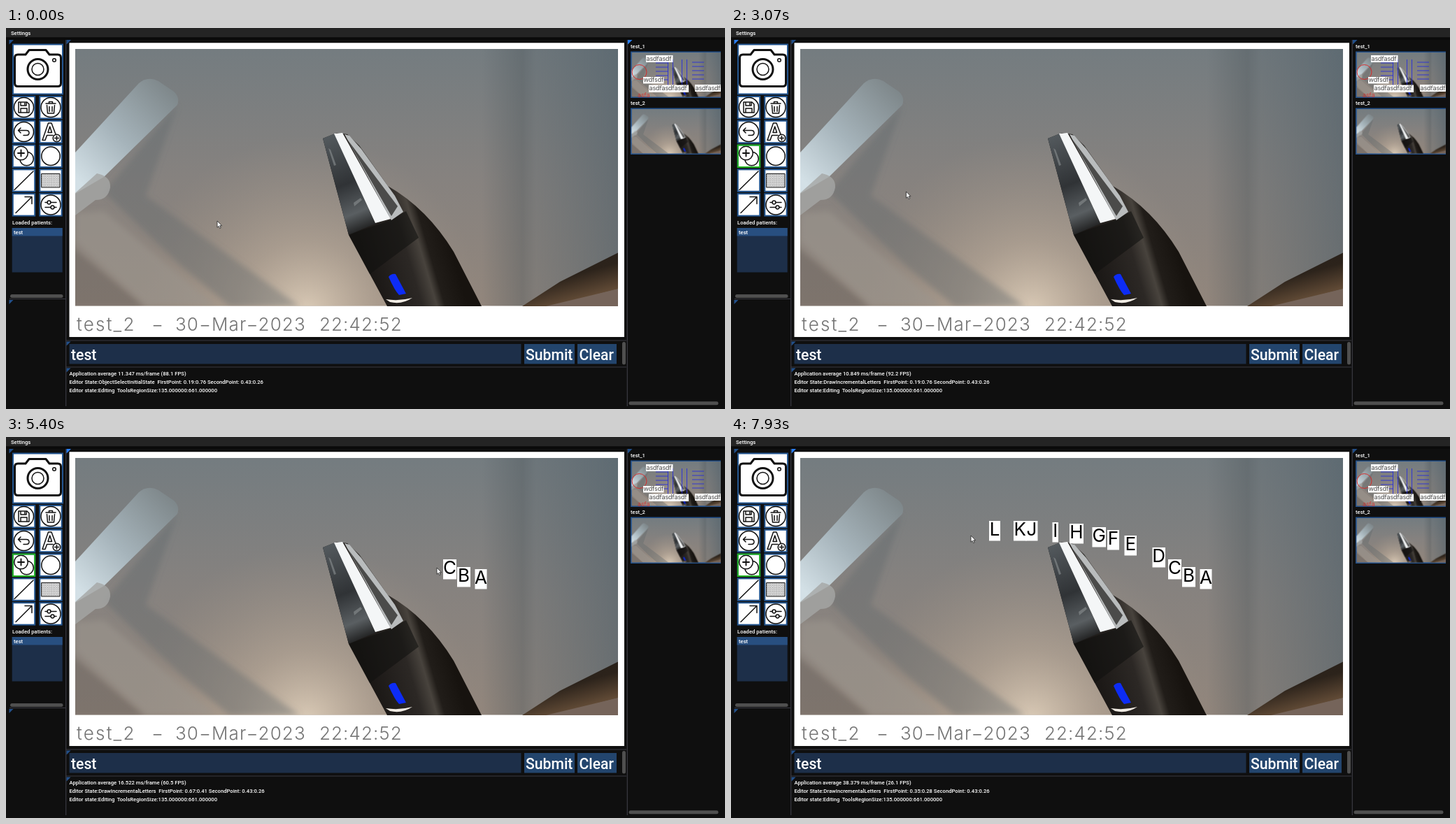
Animation, 1028 px wide and 545 px high, one loop 8 s. Source, as an HTML page:

```html
<!DOCTYPE html>
<html lang="en">
<head>
<meta charset="utf-8">
<title>Image editor</title>
<style>
  html, body { margin: 0; width: 100%; height: 100%; overflow: hidden; background: #0f0f0f; }
  svg { position: absolute; inset: 0; width: 100%; height: 100%; }
  #live { will-change: transform; }
  text { font: 500 7.65px Roboto, sans-serif; fill: #fff; white-space: pre; }
  .big { font-size: 21.2px; }
  .plot { font: 300 26px Inter, sans-serif; fill: #747474; letter-spacing: 1.1px; }
  .letter { font: 400 26px Inter, sans-serif; fill: #000; text-anchor: middle; }
  .note { font: 300 9px Inter, sans-serif; fill: #111; }
  .icon { fill: none; stroke: #111; stroke-width: 1.5; stroke-linecap: round; stroke-linejoin: round; }
</style>
</head>
<body>
<svg viewBox="0 0 1028 545" preserveAspectRatio="none">
  <defs>
    <linearGradient id="wall" x2="0" y2="1">
      <stop stop-color="#747c80"/><stop offset=".5" stop-color="#86827f"/><stop offset="1" stop-color="#92867c"/>
    </linearGradient>
    <radialGradient id="glow">
      <stop stop-color="#e2d2bd" stop-opacity=".9"/><stop offset=".4" stop-color="#c4b3a0" stop-opacity=".5"/>
      <stop offset="1" stop-color="#a39688" stop-opacity="0"/>
    </radialGradient>
    <linearGradient id="shade">
      <stop stop-color="#4c565b" stop-opacity="0"/><stop offset=".3" stop-color="#4c565b" stop-opacity=".38"/>
      <stop offset=".4" stop-color="#5a666d" stop-opacity=".3"/><stop offset="1" stop-color="#4f5f69" stop-opacity=".6"/>
    </linearGradient>
    <linearGradient id="blade" gradientUnits="userSpaceOnUse" x1="100" y1="215" x2="235" y2="85">
      <stop stop-color="#d3e0e6"/><stop offset=".45" stop-color="#a6b4bb"/><stop offset="1" stop-color="#7e878a"/>
    </linearGradient>
    <linearGradient id="facet" gradientUnits="userSpaceOnUse" x1="460" y1="155" x2="515" y2="290">
      <stop stop-color="#53595d"/><stop offset=".5" stop-color="#303336"/><stop offset=".8" stop-color="#5a5f62"/><stop offset="1" stop-color="#1c1c1c"/>
    </linearGradient>
    <linearGradient id="body" gradientUnits="userSpaceOnUse" x1="515" y1="345" x2="635" y2="310">
      <stop stop-color="#191614"/><stop offset=".5" stop-color="#2c2825"/><stop offset=".66" stop-color="#48433d"/>
      <stop offset=".75" stop-color="#211d19"/><stop offset="1" stop-color="#17130f"/>
    </linearGradient>
    <linearGradient id="arm" x2=".5" y2="1">
      <stop stop-color="#241d18"/><stop offset=".55" stop-color="#2c231b"/><stop offset="1" stop-color="#6b523b"/>
    </linearGradient>
    <filter id="soft"><feGaussianBlur stdDeviation="4"/></filter>
    <filter id="edge"><feGaussianBlur stdDeviation=".7"/></filter>
    <pattern id="dots" width="2.6" height="2.6" patternUnits="userSpaceOnUse">
      <circle cx=".7" cy=".7" r=".55" fill="#222"/><circle cx="2" cy="2" r=".55" fill="#222"/>
    </pattern>
    <symbol id="photo" viewBox="99 30 776 367.5" preserveAspectRatio="none">
      <path fill="url(#wall)" d="M99 30h776v368H99z"/>
      <circle cx="430" cy="405" r="250" fill="url(#glow)"/>
      <path fill="url(#shade)" d="M680 30h195v368H680z"/>
      <g filter="url(#soft)">
        <path fill="#626a6d" opacity=".4" d="M246 108L140 235 250 340 320 398H420L200 240z"/>
        <path fill="#9b948e" opacity=".6" d="M99 265L140 262 300 397H200L99 305z"/>
        <path fill="#6c6560" opacity=".55" d="M90 310L200 400H90z"/>
      </g>
      <g filter="url(#edge)">
        <path fill="url(#blade)" d="M99 178L190 79Q203 68 218 76L240 91Q249 99 245 110L140 213 99 237z"/>
        <path fill="#a5a7a6" opacity=".8" d="M99 236L130 208Q150 212 149 228 146 246 128 246L99 268z"/>
        <path fill="url(#body)" d="M453 158L473 150 488 152 505 168 546 226Q602 258 640 320L680 398H545L490 296z"/>
        <path fill="#121110" d="M490 296L549 275 572 262 590 300 520 352z" opacity=".6"/>
        <path fill="url(#facet)" d="M453 158L470 151 528 280 490 296z"/>
        <path fill="#b9bcbd" d="M484 152L491 154 508 173 556 240 568 263 551 275z"/>
        <path fill="#4b4b4a" d="M487 158L560 255 551 269z"/>
        <path fill="#f4f6f7" d="M469 151L481 150 550 273 528 279z"/>
        <path fill="#8b8f91" d="M461 172l3 2 8 22-3 1zM497 250l10-7 2 3-11 9z" opacity=".6"/>
        <path fill="#f1ece4" d="M543 388Q562 391 581 386 566 396 549 392z"/>
        <path fill="#0d2cf5" d="M547 356Q551 351 557 352L572 380 562 382Q556 376 547 356z"/>
        <path fill="url(#arm)" d="M738 398L792 363 876 321V373L780 398z"/>
        <path fill="#75645a" d="M772 398L876 373V398z"/>
      </g>
    </symbol>
  </defs>

  <path fill="#0f0f0f" d="M0 0h1028v545H0z"/>
  <path fill="#242424" d="M0 0h1028v13.5H0z"/>
  <path fill="#0a0a0a" d="M0 13.5h1028v3.5H0z"/>
  <text x="7" y="9.6">Settings</text>
  <path stroke="#3a3a42" stroke-width="1.2" d="M85.7 17V541M888.3 17V541M5 387.5H85M86 447H887M86 485H887"/>
  <path fill="#23508a" d="M4.500 389h6l-6 6zM86.500 448.500h6l-6 6zM86.500 486.500h6l-6 6z"/>

  <path fill="#fff" d="M90.500 21.300H884V442H90.500z"/>
  <use href="#photo" x="99" y="30" width="776" height="367.500"/>
  <g class="plot">
    <text class="plot" x="101" y="433" style="letter-spacing:2.2px">test_2</text>
    <text class="plot" x="208" y="433">−</text>
    <text class="plot" x="242" y="433">30−Mar−2023</text>
    <text class="plot" x="448" y="433">22:42:52</text>
  </g>

  <path fill="#1d2f49" d="M90.500 452H736.500V480.500H90.500z"/>
  <path fill="#23456d" d="M741 452h72v28.500h-72zM817 452h56v28.500h-56z"/>
  <text class="big" x="93" y="475">test</text>
  <text class="big" x="743" y="475">Submit</text>
  <text class="big" x="819.500" y="475">Clear</text>
  <g fill="#4f4f4f">
    <rect x="881" y="449" width="5" height="32.500" rx="2.500"/>
    <rect x="6" y="381" width="75.500" height="5" rx="2.500"/>
    <rect x="890.500" y="534.300" width="128" height="5" rx="2.500"/>
  </g>

  <text x="9" y="281">Loaded patients:</text>
  <path fill="#1d2f49" d="M8.700 286H80.700V349.500H8.700z"/>
  <path fill="#284f80" d="M8.700 286H80.700V297.600H8.700z"/>
  <text x="11" y="294.700">test</text>

  <text x="893" y="29.300">test_1</text>
  <text x="893" y="110.300">test_2</text>
  <path fill="#23508a" d="M893 33.500h129v66.500H893zM893 114.500h129V181H893z"/>
  <use href="#photo" x="894.500" y="35" width="127.500" height="63.500"/>
  <use href="#photo" x="894.500" y="116" width="127.500" height="63.500"/>
  <svg x="894" y="35" width="128" height="64" viewBox="894 35 128 64" style="inset:auto">
    <g fill="none" stroke="#2a2fd8" stroke-width=".9">
      <path d="M929 50h18m-18 6h18m-18 6h18m-18 6h18m-18 6h18M981 49h17m-17 6h17m-17 6h17m-17 6h17m-17 6h17M946.500 45v37M953.500 45v36M966.500 45v36M973.500 45v36"/>
      <circle cx="905.500" cy="63" r="10.500" stroke="#d22"/>
    </g>
    <path fill="#fff" d="M915 39h38.500v10H915zM911 70h29.500v9.500H911zM919 81.500h57v10.500h-57zM985 81h40v10h-40z"/>
    <text class="note" x="915.500" y="46.500">asdfasdf</text>
    <text class="note" x="911.500" y="77.300">wdfsdf</text>
    <text class="note" x="919.500" y="89.300">asdfasdfasdf</text>
    <text class="note" x="985.500" y="88.500">asdfasdf</text>
    <text class="note" x="903" y="99" style="fill:#d22">asfa</text>
  </svg>

  <g id="buttons"></g>
  <g class="icon">
    <g stroke-width="3">
      <path d="M17 38H28L33 31.500H57L62 38H74Q78.500 38 78.500 42.500V79Q78.500 83.500 74 83.500H17Q12.500 83.500 12.500 79V42.500Q12.500 38 17 38z"/>
      <circle cx="45.500" cy="59" r="14.500"/>
    </g>
    <circle cx="45.500" cy="59" r="8.500"/><circle cx="69" cy="46" r="2.300"/>
    <g id="rings"></g>
    <path d="M18 106H30L33 109V121H18zM21 106V111H29V106M21 121V115H30V121M26.800 107.500V109.500"/>
    <path d="M57 108H71M61.500 108V105.500H66.500V108M58.500 110.500L59.500 122H68.500L69.500 110.500M62 112.500V119.500M66 112.500V119.500"/>
    <path d="M21 143L17.500 146.500 21 150M18 146.500H29Q33 146.500 33 150T29 153.500H25"/>
    <path d="M52 160.500L60.500 136H65L71 152M52 160.500H56L58.500 153.500H67M60 149.500H65.500L62.700 141z"/>
    <circle cx="72.500" cy="157.500" r="5.300" fill="#fff"/><path d="M72.500 154.500V160.500M69.500 157.500H75.500"/>
    <circle cx="29.500" cy="187" r="9.800"/><circle cx="21.500" cy="179" r="9.800" fill="#fff"/>
    <path d="M21.500 174.500V183.500M17 179H26" stroke-width="1.900"/>
    <circle cx="64" cy="183.300" r="13.200"/>
    <path d="M12 231.500L39 205M14 264.500L37 241.500M27 241.500H37V251.500"/>
    <path d="M51 208.500H77V228H51z" fill="url(#dots)" stroke-width="1"/>
    <path d="M56 249.500H59M64 249.500H72M56 256.500H64M69 256.500H72"/>
    <circle cx="61.500" cy="249.500" r="2.400"/><circle cx="66.500" cy="256.500" r="2.400"/>
  </g>
</svg>

<svg id="live" viewBox="0 0 1028 545" preserveAspectRatio="none">
  <g id="tabs"></g>
  <path id="splitter" stroke="#1a66bf" stroke-width="1.6" d="M85.700 17V541"/>
  <rect id="active" fill="none" stroke="#22b422" stroke-width="2"/>
  <rect id="hover" fill="none" stroke="#4296fa" stroke-width="2"/>
  <text id="fps" x="90.500" y="497.300"></text>
  <text id="state" x="90.500" y="509.200"></text>
  <text x="90.500" y="521">Editor state:Editing  ToolsRegionSize:135.000000:661.000000</text>
  <g id="labels"></g>
  <path id="cursor" fill="#fff" stroke="#222" stroke-width=".8" d="M0 0V9.300L2.100 7.400 3.700 10.700 5.200 10 3.700 6.800H6.600z"/>
</svg>

<script>
const LOOP = 8000, STEP = 200 / 3;
const PICK_TOOL = 2690, FIRST_LETTER = 4450;
const $ = id => document.getElementById(id);

// time, x, y of the pointer tip
const pointerPath = [
  [0, 302, 276], [900, 300, 277], [1150, 230, 240], [1550, 72, 160], [1866, 69, 157],
  [2050, 68, 158], [2350, 27, 184], [2800, 27, 184], [3066, 250, 234], [3480, 520, 228],
  [4066, 658, 216], [4330, 671, 209], [4500, 671, 209], [4850, 646, 207], [5200, 635, 200],
  [5310, 625, 195], [5400, 616, 187], [5800, 603, 178], [6070, 573, 165], [6200, 563, 161],
  [6450, 538, 153], [6660, 517, 149], [6870, 484, 144], [7000, 460, 142], [7066, 439, 141],
  [7380, 422, 140], [7520, 404, 140], [7720, 369, 140], [7800, 354, 141], [7933, 343, 141]
];
const frameCost = [
  [0, 11.347], [1866, 11.055], [3066, 10.849], [4066, 10.777], [4450, 10.75],
  [5400, 16.522], [7066, 30.728], [7933, 38.379]
];
// letter, click time, left, top, width
const letters = [
  ["A", 4450, 670.5, 189, 17], ["B", 4850, 645, 186, 19], ["C", 5310, 625, 175, 19],
  ["D", 5800, 602.5, 158, 18.5], ["E", 6200, 562.5, 141, 17.5], ["F", 6450, 538, 133, 17],
  ["G", 6660, 516.5, 129, 19.5], ["H", 6870, 484, 124, 20], ["I", 6990, 459.5, 122, 8.5],
  ["J", 7380, 421.5, 120, 17], ["K", 7520, 404, 120, 18.5], ["L", 7720, 369, 120, 16]
];

const buttons = [[9, 22.5, 73, 73]];
for (let row = 0; row < 5; row++)
  for (const x of [8.8, 47.3]) buttons.push([x, 97 + row * 34.8, 33.4, 33.4]);
const TOOL = buttons[5];

const rect = ([x, y, w, h], attrs) => `<rect x="${x}" y="${y}" width="${w}" height="${h}" ${attrs}/>`;
$("buttons").innerHTML = buttons.map(([x, y, w, h]) =>
  rect([x + 1, y + 1, w - 2, h - 2], 'fill="#fff" stroke="#23558f" stroke-width="2"')).join("");
$("rings").innerHTML = [[25.5, 113.5], [64, 113.5], [25.5, 148.5], [64, 253]]
  .map(([x, y]) => `<circle cx="${x}" cy="${y}" r="14"/>`).join("");
$("tabs").innerHTML = [4.5, 86.5, 889].map(x => `<path d="M${x} 17h6.5l-6.500 6.500z"/>`).join("");
$("labels").innerHTML = letters.map(([ch, , x, y, w]) =>
  `<g>${rect([x, y, w, 28.5], 'fill="#fff"')}<text class="letter" x="${x + w / 2}" y="${y + 21}">${ch}</text></g>`).join("");

function sample(keys, t) {
  let i = keys.findIndex(k => k[0] > t);
  if (i < 0) return keys[keys.length - 1].slice(1);
  const a = keys[i - 1], b = keys[i], f = (t - a[0]) / (b[0] - a[0]);
  return a.slice(1).map((v, n) => v + (b[n + 1] - v) * f);
}

function outline(el, box) {
  el.style.display = box ? "" : "none";
  if (!box) return;
  const [x, y, w, h] = box;
  Object.entries({ x: x + 1, y: y + 1, width: w - 2, height: h - 2 }).forEach(([k, v]) => el.setAttribute(k, v));
}

function render(now) {
  const t = Math.floor((now % LOOP + 4) / STEP) * STEP;
  const [x, y] = sample(pointerPath, t), [ms] = sample(frameCost, t);
  const picked = t >= PICK_TOOL;

  $("cursor").setAttribute("transform", `translate(${x} ${y})`);
  $("splitter").style.display = Math.abs(x - 86) < 4 ? "" : "none";
  const over = buttons.find(([bx, by, w, h]) => x >= bx && x <= bx + w && y >= by && y <= by + h);
  outline($("active"), picked && TOOL);
  outline($("hover"), over === TOOL && picked ? null : over);

  const focus = t >= FIRST_LETTER ? 1 : picked ? 0 : 2;
  [...$("tabs").children].forEach((tab, i) => tab.setAttribute("fill", i === focus ? "#2b80f5" : "#23508a"));

  let point = "0.19:0.76";
  letters.forEach(([, at, lx, ly], i) => {
    const shown = t >= at;
    $("labels").children[i].style.display = shown ? "" : "none";
    if (shown) point = `${((lx - 90) / 794).toFixed(2)}:${((ly - 1) / 421).toFixed(2)}`;
  });
  $("fps").textContent = `Application average ${ms.toFixed(3)} ms/frame (${(1000 / ms).toFixed(1)} FPS)`;
  $("state").textContent = `Editor State:${picked ? "DrawIncrementalLetters" : "ObjectSelectInitialState"}` +
    `  FirstPoint: ${point} SecondPoint: 0.43:0.26`;
  requestAnimationFrame(() => render(performance.now()));
}
render(0);
</script>
</body>
</html>
```
